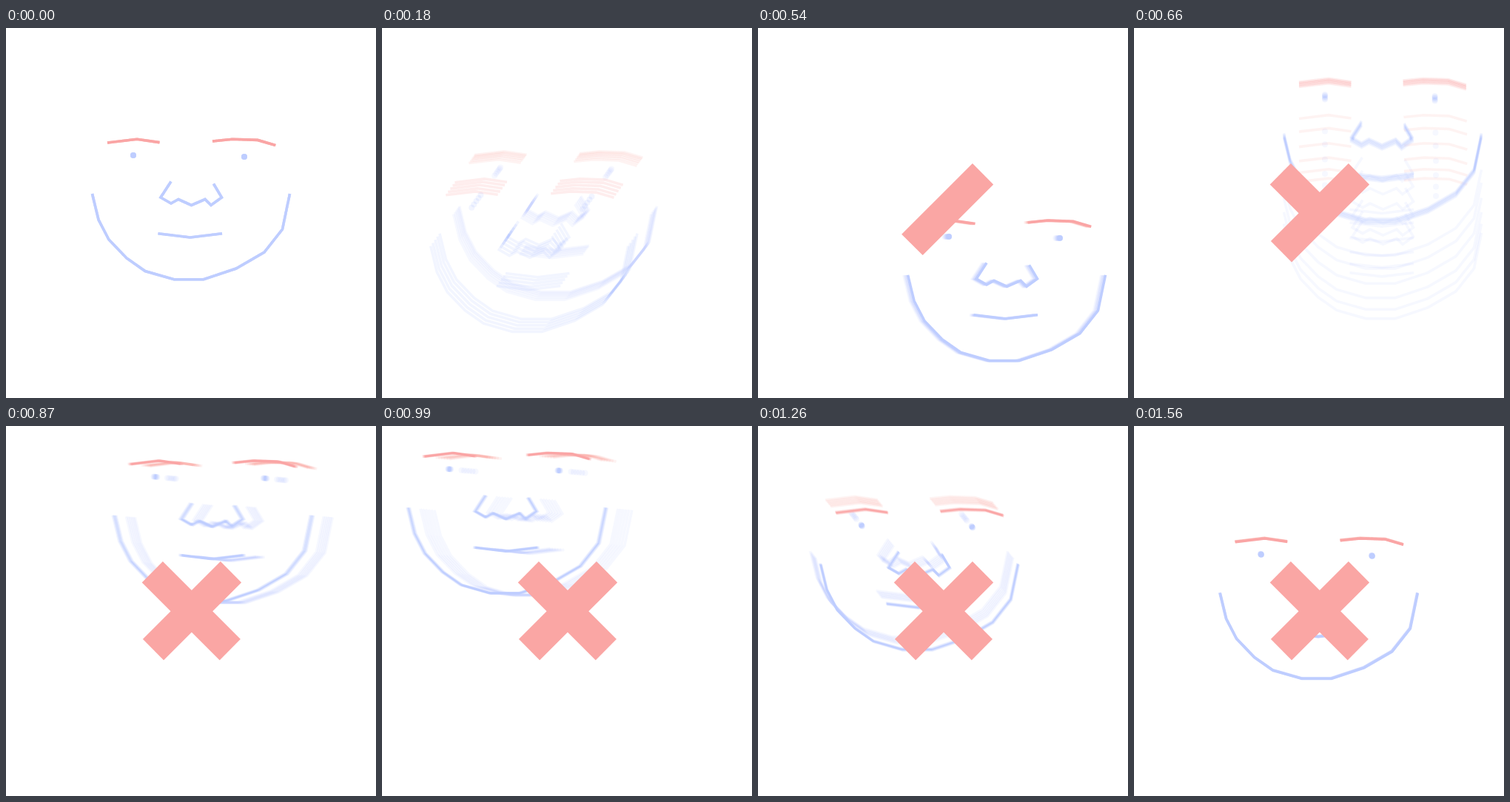
Recreate the animation shown at these times as an HTML page with a canvas. Size 500x500 px, loop 1590 ms.

```html
<!DOCTYPE html>
<html lang="en">
<head>
<meta charset="utf-8">
<title>Drifting face</title>
<style>
  html, body { margin: 0; width: 100%; height: 100%; overflow: hidden; background: #fff; }
  canvas { display: block; width: 500px; height: 500px; }
</style>
</head>
<body>
<canvas id="stage" width="500" height="500"></canvas>
<script>
const SIZE = 500, LOOP = 1590, STEP = 30;
const BLUE = 'rgb(192,206,255)', RED = 'rgb(250,166,164)';
const ctx = document.getElementById('stage').getContext('2d');

const makeLayer = () => {
  const canvas = document.createElement('canvas');
  canvas.width = canvas.height = SIZE;
  return canvas.getContext('2d');
};
const trailLayer = makeLayer(), mainLayer = makeLayer();

const leftBrow = [[137, 155], [177, 150.2], [207.5, 154.6]];
const rightBrow = [[279, 153], [306, 150.2], [340, 151.4], [364.3, 158.6]];
const nose = [[223, 207.5], [209, 229], [223, 237], [233, 231.5], [250.5, 239.5],
  [269, 231.5], [277, 239.5], [291.5, 229], [280.5, 210.5]];
const mouth = [[205.5, 277.8], [249, 283], [292, 277.8]];
const jaw = [[116.5, 224], [125, 259], [139, 286], [163, 311], [188, 328.5], [227, 339.7],
  [267, 339.7], [311, 325], [349, 303], [373.5, 272], [383.5, 224]];

// Stops of the drift: arrival time, offset, and the easing handles of the way there.
const stops = [
  { t: 0, x: 0, y: 0 },
  { t: 294, x: -80.5, y: 112, ease: [1, 0.28] },
  { t: 534, x: 86, y: 110, ease: [0.5, 0.5] },
  { t: 710, x: 86, y: -98, ease: [0.83, 0.29] },
  { t: 1035, x: -94.5, y: -115, ease: [0.59, 0.7] },
  { t: 1590, x: 0, y: 2, ease: [0.33, 0.2] }
];

const clamp = (v, lo, hi) => Math.min(hi, Math.max(lo, v));
const smooth = p => p * p * (3 - 2 * p);

// Cubic bezier easing with handles (x1, 0) and (x2, 1).
function bezierEase(p, [x1, x2]) {
  let lo = 0, hi = 1;
  for (let i = 0; i < 24; i++) {
    const u = (lo + hi) / 2, v = 1 - u;
    if (3 * x1 * u * v * v + 3 * x2 * u * u * v + u * u * u < p) lo = u;
    else hi = u;
  }
  return smooth((lo + hi) / 2);
}

function offsetAt(time) {
  const t = clamp(time, 0, LOOP);
  const i = Math.max(1, stops.findIndex(s => t <= s.t));
  const a = stops[i - 1], b = stops[i];
  const k = bezierEase((t - a.t) / (b.t - a.t), b.ease);
  return { x: a.x + (b.x - a.x) * k, y: a.y + (b.y - a.y) * k };
}

function polyline(g, points, color, dx = 0) {
  g.beginPath();
  for (const [x, y] of points) g.lineTo(x + dx, y);
  g.strokeStyle = color;
  g.stroke();
}

function dot(g, x, y) {
  g.beginPath();
  g.arc(x, y, 4, 0, 2 * Math.PI);
  g.fillStyle = BLUE;
  g.fill();
}

function drawFace(g, time) {
  const { x, y } = offsetAt(time);
  const lag = 0.018 * Math.min(0, y);
  g.setTransform(1, 0, 0, 1, x, y);
  g.lineWidth = 3.6;
  polyline(g, jaw, BLUE);
  polyline(g, mouth, BLUE);
  polyline(g, nose, BLUE, lag);
  dot(g, 172, 172);
  dot(g, 322 + lag, 174);
  polyline(g, leftBrow, RED);
  polyline(g, rightBrow, RED, lag);
}

// Averages the face over several moments into one layer.
function exposeFace(layer, times, alpha) {
  layer.setTransform(1, 0, 0, 1, 0, 0);
  layer.clearRect(0, 0, SIZE, SIZE);
  layer.globalCompositeOperation = 'lighter';
  layer.globalAlpha = 1 / times.length;
  times.forEach(time => drawFace(layer, time));
  ctx.globalAlpha = alpha;
  ctx.drawImage(layer.canvas, 0, 0);
  ctx.globalAlpha = 1;
}

// One arm of the cross, growing downwards; side is 1 from the right, -1 from the left.
function drawArm(side, progress) {
  if (progress <= 0) return;
  const length = 148.5, skew = 4.5 * (1 - progress);
  const inner = clamp(length * progress + skew / 2, 0, length) * Math.SQRT1_2;
  const outer = clamp(length * progress - skew / 2, 0, length) * Math.SQRT1_2;
  const corners = [[39, -67], [67.2, -38.6], [67.2 - outer, -38.6 + outer], [39 - inner, -67 + inner]];
  ctx.beginPath();
  for (const [x, y] of corners) ctx.lineTo(250.9 + side * x, 250 + y);
  ctx.fillStyle = RED;
  ctx.fill();
}

const growth = (t, start, end) => smooth(clamp((t - start) / (end - start), 0, 1));

function render(t) {
  ctx.fillStyle = '#fff';
  ctx.fillRect(0, 0, SIZE, SIZE);
  exposeFace(trailLayer, [42, 38, 34, 30, 26, 22].map(d => t - d), 0.8);
  exposeFace(mainLayer, [-3, -1.5, 0, 1.5, 3].map(d => t + d), 1);
  drawArm(1, growth(t, 362, 580));
  drawArm(-1, growth(t, 570, 750));
}

function tick() {
  const t = performance.now() % LOOP;
  render(Math.floor(t / STEP) * STEP);
  requestAnimationFrame(tick);
}
tick();
</script>
</body>
</html>
```
